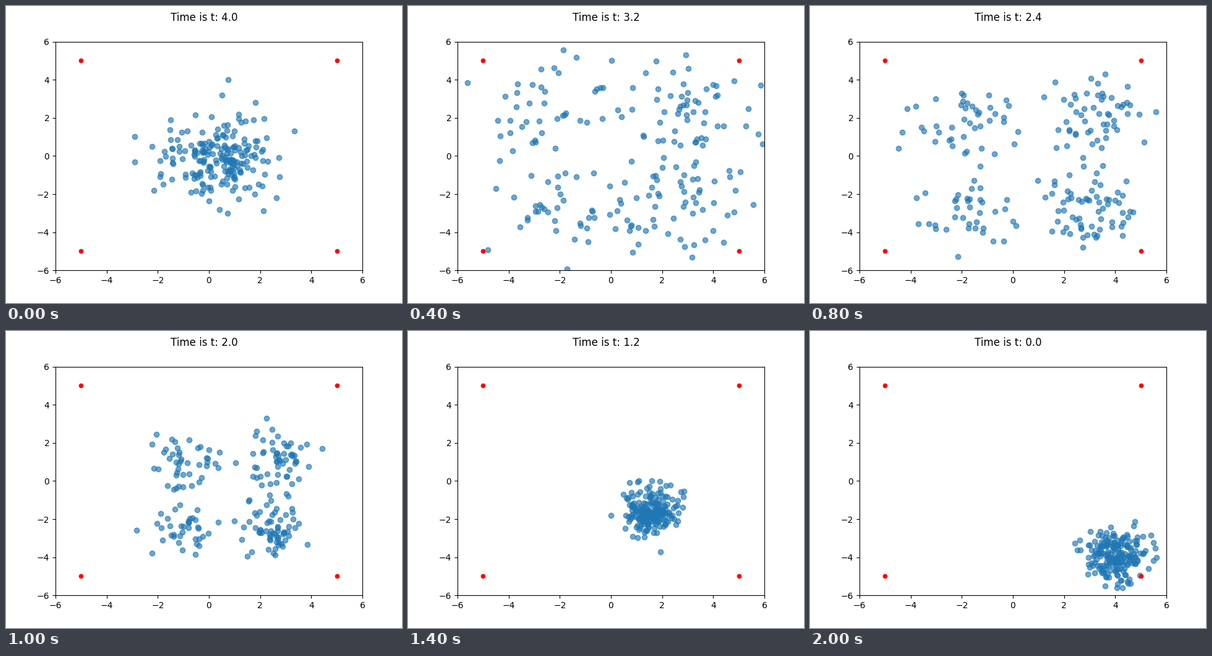
Write a matplotlib script that moves like this. It is 640 px wide and 480 px high and loops after 2.05 s.

```python
import numpy as np
import matplotlib.pyplot as plt
from matplotlib.animation import FuncAnimation

FRAMES = 41
COUNT = 200
T_START = 4.0
DT = 0.1
MERGE = 2.8    # elapsed time at which the four groups are one again
MEMORY = 0.95  # how much of each particle's scatter survives one step

START = np.array([0.3, -0.15])
END = np.array([4.0, -3.9])
TARGETS = np.array([(x, y) for x in (-5, 5) for y in (-5, 5)])


def centre(s):
    """Swarm centre: drifts slowly, then rushes to the end point."""
    return START + (END - START) * (s / T_START) ** np.array([3.1, 2.7])


def split(s):
    """Half distance between the groups: opens and closes once."""
    return 2.2 * np.sin(np.pi * min(s / MERGE, 1)) ** 1.3 if s < MERGE else 0.0


def spread(s):
    """Scatter within a group: an early burst, then slow widening."""
    burst = np.exp(-((s - 0.85) / 0.9) ** 2)
    return 0.5 + 1.1 * burst + 0.15 * (s / T_START) ** 4


def simulate():
    rng = np.random.default_rng(11)
    start = rng.normal(START, 1.15, (COUNT, 2))
    side = np.sign(start - START / 2 + rng.normal(0, 0.6, start.shape))
    scatter = (start - centre(0)) / spread(0)

    path = []
    for s in DT * np.arange(FRAMES):
        path.append(centre(s) + split(s) * side + spread(s) * scatter)
        kick = rng.normal(size=start.shape)
        scatter = MEMORY * scatter + np.sqrt(1 - MEMORY**2) * kick
    return path


path = simulate()

fig, ax = plt.subplots(figsize=(6.4, 4.8), dpi=100)
ax.set(xlim=(-6, 6), ylim=(-6, 6))
swarm = ax.scatter(*path[0].T, color="tab:blue", alpha=0.65)
ax.plot(*TARGETS.T, "r.", markersize=9)
title = fig.suptitle("")


def update(k):
    swarm.set_offsets(path[k])
    title.set_text(f"Time is t: {abs(T_START - DT * k):.1f}")
    return swarm, title


anim = FuncAnimation(fig, update, frames=FRAMES, interval=50,
                     repeat=True, repeat_delay=0, blit=False)
plt.show()
```
